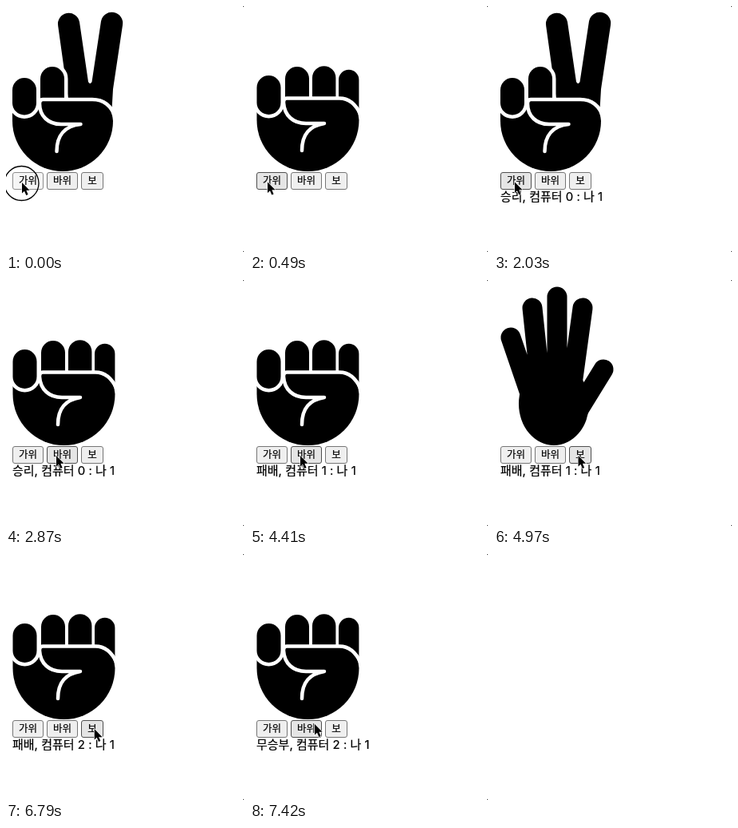
An HTML page that plays this animation: 298 by 308 pixels, repeating every 8000 ms.

```html
<!DOCTYPE html>
<html lang="ko">
<head>
<meta charset="utf-8">
<style>
  html, body { margin: 0; width: 100%; height: 100%; overflow: hidden; background: #fff; }
  svg { display: block; width: 100%; height: 100%; }
  text { font-family: Inter, "Noto Sans CJK KR", "Noto Sans CJK", sans-serif; stroke: #000; stroke-width: .2; }
  .button rect { fill: #efefef; stroke: #767676; }
  .button.hover rect { fill: #e5e5e5; stroke: #4f4f4f; }
  .button.active rect { fill: #f5f5f5; stroke: #8d8d8d; }
  .button text { font-size: 12.5px; text-anchor: middle; }
  #score { font-size: 15px; }
  .gap { stroke: #fff; stroke-width: 9; paint-order: stroke; }
  .thumb { fill: none; stroke: #fff; stroke-width: 4.5; stroke-linecap: round; stroke-linejoin: round; }
  .open path { fill: none; stroke: #000; stroke-linecap: round; }
</style>
</head>
<body>
<svg viewBox="0 0 298 308">
  <g class="hand">
    <path d="M8 144A63 63 0 0 0 134 144Q132 117 108 117H8Z"/>
    <path d="M78 117L65.2 25A13.6 13.6 0 0 1 92 20L103 95Q105.3 99 107.5 95L119 19A13.6 13.6 0 0 1 146 24L134 104L132.500 130L108 117Z"/>
    <path class="gap" d="M43 117V91a15 15 0 0 1 30 0V117Z"/>
    <path d="M42 119H80V135H50Z"/>
    <rect class="gap" x="8" y="90" width="30" height="46.500" rx="15"/>
    <path class="thumb" d="M136.500 140C133 125 122 117 108 117H46Q42 117 42 122C42 138 53 148 69 148H93.500C74 150 63.500 162 63.500 182"/>
  </g>
  <g class="hand">
    <path d="M8.500 143A64 64 0 0 0 136.500 143Q134 115.500 112 115.500H8.500Z"/>
    <path d="M44 117V91a15 15 0 0 1 30 0V117ZM78 117V90a14.700 14.700 0 0 1 29.400 0V117ZM111 116V92.500a12.700 12.700 0 0 1 25.400 0V129Z"/>
    <rect class="gap" x="8.500" y="87" width="30" height="49" rx="15"/>
    <path class="thumb" d="M138.500 136C132 122 124 115.500 112 115.500H46Q42 115.500 42 121C43 137 54 147 70 147H93C75 150 65 160 65 181"/>
  </g>
  <g class="hand open">
    <path stroke-width="25" d="M46 145L21 72M58 130L48 35M79 130V21M98 130L111 35M100 172L137 112"/>
    <ellipse cx="75" cy="155" rx="44" ry="52"/>
  </g>
  <g id="buttons"></g>
  <text id="score" x="8" y="244"></text>
  <circle id="press" r="21.500" fill="none" stroke="#000" stroke-width="1.300"/>
  <path id="cursor" d="M0 0V13.500L3 10.700L5.300 16L7.600 15L5.400 9.800H9.600Z" stroke="#fff" stroke-width="1.200" paint-order="stroke"/>
  <path d="M296.500 0H298V1.500ZM298 306.500V308H296.500Z" fill="#333"/>
</svg>
<script>
const LOOP = 8000, STEP = 70;
const SCISSORS = 0, ROCK = 1, PAPER = 2;
const $ = id => document.getElementById(id);

// Hands advance 4/3 of a turn per step until the click at `stop`.
const rounds = [
  { start: 0, stop: 910, first: SCISSORS, phase: 0.8, result: PAPER, score: "승리, 컴퓨터 0 : 나 1" },
  { start: 2030, stop: 3290, first: SCISSORS, phase: 0.8, result: PAPER, score: "패배, 컴퓨터 1 : 나 1" },
  { start: 4410, stop: 5530, first: SCISSORS, phase: 1.15, result: SCISSORS, score: "패배, 컴퓨터 2 : 나 1" },
  { start: 6650, stop: 7420, first: ROCK, phase: 1.15, result: ROCK, score: "무승부, 컴퓨터 2 : 나 1" }
];

// Cursor stops: time, x, y
const moves = [
  [0, 20, 221], [490, 22, 220.5], [840, 25, 220.5], [2030, 26, 220.5],
  [2730, 63, 220], [4410, 63, 220], [5180, 115, 220], [6650, 115, 220],
  [7280, 81, 213], [LOOP, 81, 213]
];

const buttons = [["가위", 8, 39], ["바위", 51, 39], ["보", 94, 28]].map(([label, x, width]) => {
  const group = document.createElementNS("http://www.w3.org/2000/svg", "g");
  group.innerHTML = `<rect x="${x + .5}" y="208.5" width="${width - 1}" height="21" rx="2.5"/>
    <text x="${x + width / 2}" y="222.5">${label}</text>`;
  $("buttons").append(group);
  return { group, x, width };
});
const hands = document.querySelectorAll(".hand");

function cursorAt(t) {
  const i = moves.findIndex(m => m[0] > t);
  const [t0, x0, y0] = moves[i - 1], [t1, x1, y1] = moves[i];
  const u = (t - t0) / (t1 - t0), ease = u * u * (3 - 2 * u);
  return [x0 + (x1 - x0) * ease, y0 + (y1 - y0) * ease];
}

function draw(time) {
  const t = Math.floor(time / STEP) * STEP;
  const index = rounds.findLastIndex(r => t >= r.start);
  const round = rounds[index], stopped = t >= round.stop;
  const turns = Math.floor((t - round.start) / STEP * 4 / 3 + round.phase);
  const hand = stopped ? round.result : (round.first + turns) % 3;
  hands.forEach((el, i) => el.style.display = i === hand ? "" : "none");
  $("score").textContent = stopped ? round.score : index ? rounds[index - 1].score : "";

  const [x, y] = cursorAt(t);
  const pressed = t === 0 || t === round.stop - STEP;
  $("cursor").setAttribute("transform", `translate(${x} ${y})`);
  $("press").setAttribute("transform", `translate(${x - .5} ${y + 1})`);
  $("press").style.display = pressed ? "" : "none";
  for (const b of buttons) {
    const over = x >= b.x && x < b.x + b.width;
    b.group.setAttribute("class", "button" + (over ? pressed ? " active" : " hover" : ""));
  }
}

const began = performance.now();
function tick() {
  draw((performance.now() - began) % LOOP);
  requestAnimationFrame(tick);
}
tick();
</script>
</body>
</html>
```
